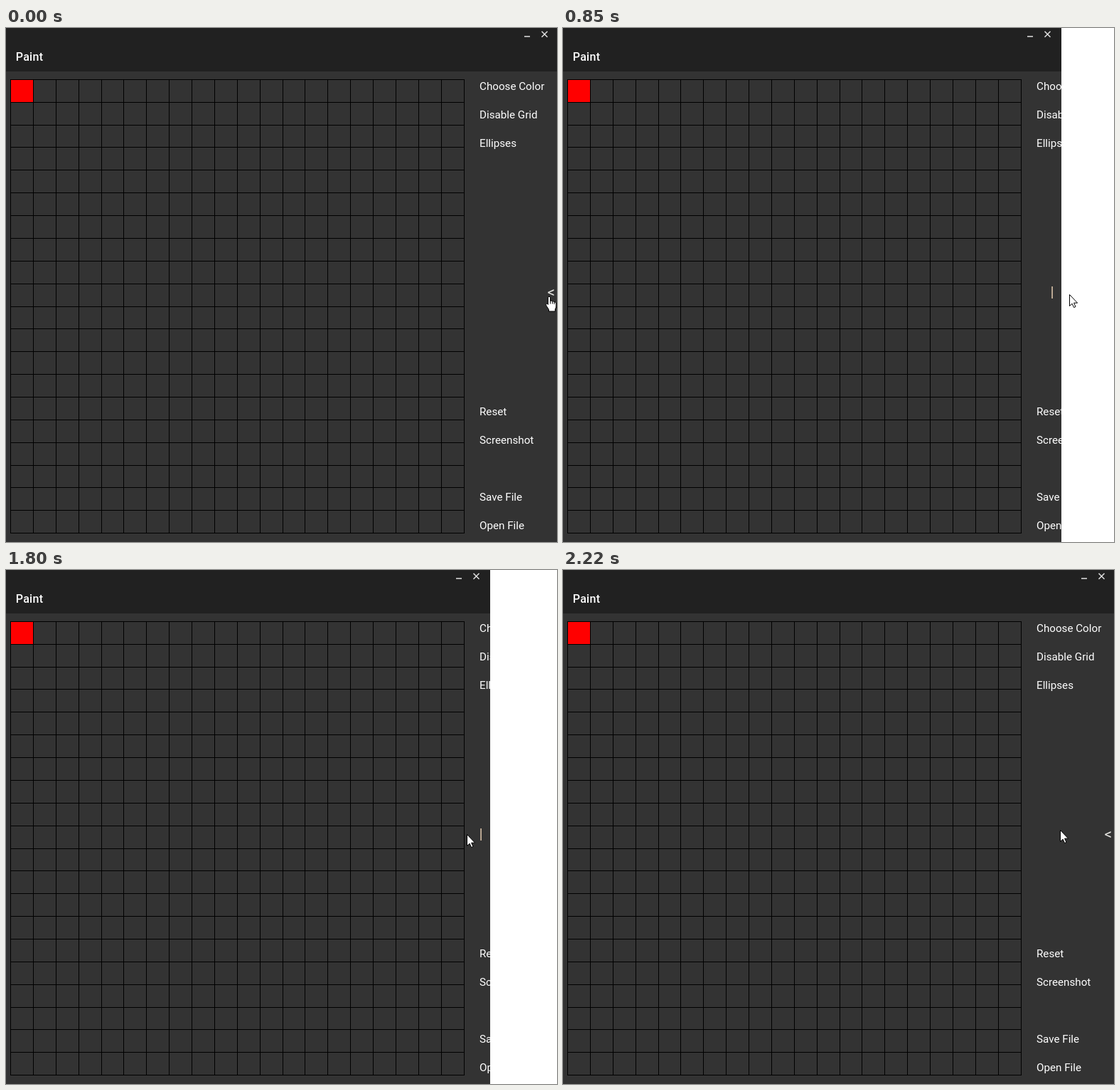
An HTML page for the animation above (2870 ms loop, 775 by 722 pixels).

```html
<!DOCTYPE html>
<html lang="en">
<head>
<meta charset="utf-8">
<title>Paint</title>
<style>
  html, body { margin: 0; width: 100%; height: 100%; overflow: hidden; background: #fff; }
  svg { display: block; width: 775px; height: 722px; }
  text { font-family: Roboto, "Open Sans", sans-serif; fill: #fff; white-space: pre; }
  .menu text { font-size: 15.2px; }
  .title { font-size: 16px; font-weight: 500; letter-spacing: .3px; }
  .toggle { font-size: 21px; }
  .icon { fill: none; stroke: #e2e2e2; stroke-width: 1.5; }
  .pointer path { fill: #fff; stroke: #000; stroke-width: 1; stroke-linejoin: round; }
  .pointer .crease { fill: none; }
</style>
</head>
<body>
<svg viewBox="0 0 775 722">
  <rect width="775" height="722" fill="#333"/>
  <rect width="775" height="61" fill="#212121"/>
  <text class="title" x="13.7" y="45.5">Paint</text>
  <rect x="7" y="73" width="31" height="31" fill="#f00"/>
  <path id="grid" fill="none" stroke="#000" stroke-width="1"/>
  <g id="menu" class="menu"></g>
  <rect id="outside" y="0" width="200" height="722" fill="#fff"/>
  <g id="edge">
    <path class="icon" d="M-48 11.9h8"/>
    <path class="icon" d="M-23.5 4.7l8 8m0-8l-8 8"/>
    <text id="toggle" class="toggle" x="-15.4" y="378"></text>
  </g>
  <g id="pointer" class="pointer">
    <circle id="click" cx="0" cy="-.5" r="12" fill="#ff0" fill-opacity=".5"/>
    <path id="arrow" d="M.5 .5V16.5L4.1 13.2L6.6 18.6L9 17.5L6.6 12.2H11.6Z"/>
    <g id="hand">
      <path d="M-1.6 1.8Q-1.6 .3 0 .3Q1.6 .3 1.6 1.8V6.2Q3.2 5.4 4.3 6.9Q6 6.3 7 7.9Q9.8 7.4 9.8 10V14Q9.8 16 8.4 18V21H-.5V18.5L-4 13.2Q-5 11 -3.4 10.2Q-2.4 9.8 -1.6 11.5Z"/>
      <path class="crease" d="M1.6 6v4.5M4.4 7v3.5M7.1 8v3"/>
    </g>
  </g>
</svg>
<script>
const LOOP = 2870;
const OPEN_WIDTH = 777, CLOSED_WIDTH = 665, STEP = 4;
const STEPS = (OPEN_WIDTH - CLOSED_WIDTH) / STEP;
const CLOSE_AT = 548, OPEN_AT = 1736;

// The screen refreshes only at these moments (ms).
const TICKS = [0, 490, 580, 630, 670, 720, 760, 810, 850, 900, 940, 990, 1040, 1090,
  1270, 1320, 1370, 1420, 1470, 1650, 1750, 1800, 1850, 1890, 1940, 1980, 2030,
  2090, 2130, 2180, 2220];

// Pointer route: time, x, y.
const ROUTE = [[0, 764, 377], [720, 764, 377], [990, 655, 371], [1040, 648, 371],
  [1090, 639, 371], [1230, 639, 371], [1470, 649, 371], [1740, 649, 371],
  [1800, 648, 371], [2030, 694, 364], [2110, 699, 365], [LOOP, 699, 365]];

const MENU = [["Choose Color", 87], ["Disable Grid", 126.7], ["Ellipses", 166.5],
  ["Reset", 544], ["Screenshot", 584], ["Save File", 663.7], ["Open File", 703.5]];

const el = id => document.getElementById(id);
const show = (id, on) => el(id).setAttribute("visibility", on ? "visible" : "hidden");
const clamp = (v, lo, hi) => Math.min(hi, Math.max(lo, v));

function buildGrid() {
  const at = (start, i) => Math.floor(start + 31.87 * i) + 0.5;
  let d = "";
  for (let i = 0; i <= 20; i++) {
    d += `M${at(6.6, i)} 72V710M6 ${at(72.3, i)}H645`;
  }
  el("grid").setAttribute("d", d);
}

function buildMenu() {
  el("menu").innerHTML = MENU.map(([label, y]) => `<text x="666" y="${y}">${label}</text>`).join("");
}

function stepsOpen(t) {
  const done = (start, pace) => clamp(Math.floor((t - start) / pace), 0, STEPS);
  return t < OPEN_AT ? STEPS - done(CLOSE_AT, 15.6) : done(OPEN_AT, 15.4);
}

function pointerAt(t) {
  const i = ROUTE.findIndex(p => p[0] > t);
  const [t0, x0, y0] = ROUTE[i - 1], [t1, x1, y1] = ROUTE[i];
  const k = (t - t0) / (t1 - t0);
  return [Math.round(x0 + (x1 - x0) * k), Math.round(y0 + (y1 - y0) * k)];
}

function toggleLabel(t, steps) {
  if (steps === STEPS) return "<";
  if (steps === 0 && t < OPEN_AT) return ">";
  return "|";
}

function draw(time) {
  const t = TICKS.filter(v => v <= time).pop();
  const steps = stepsOpen(t);
  const width = CLOSED_WIDTH + STEP * steps;
  const label = toggleLabel(t, steps);
  const [x, y] = pointerAt(t);
  const hand = t < 600 || (t >= 990 && t < OPEN_AT && x >= 646);

  el("outside").setAttribute("x", width);
  el("edge").setAttribute("transform", `translate(${width} 0)`);
  el("toggle").textContent = label;
  el("toggle").style.fill = label === "|" ? "#e2cbb0" : "#e4e4e0";
  el("pointer").setAttribute("transform", `translate(${x} ${y})`);
  show("hand", hand);
  show("arrow", !hand);
  show("click", t === 490 || t === 1650);
}

buildGrid();
buildMenu();
const start = performance.now();
function frame() {
  draw((performance.now() - start) % LOOP);
  requestAnimationFrame(frame);
}
frame();
</script>
</body>
</html>
```
